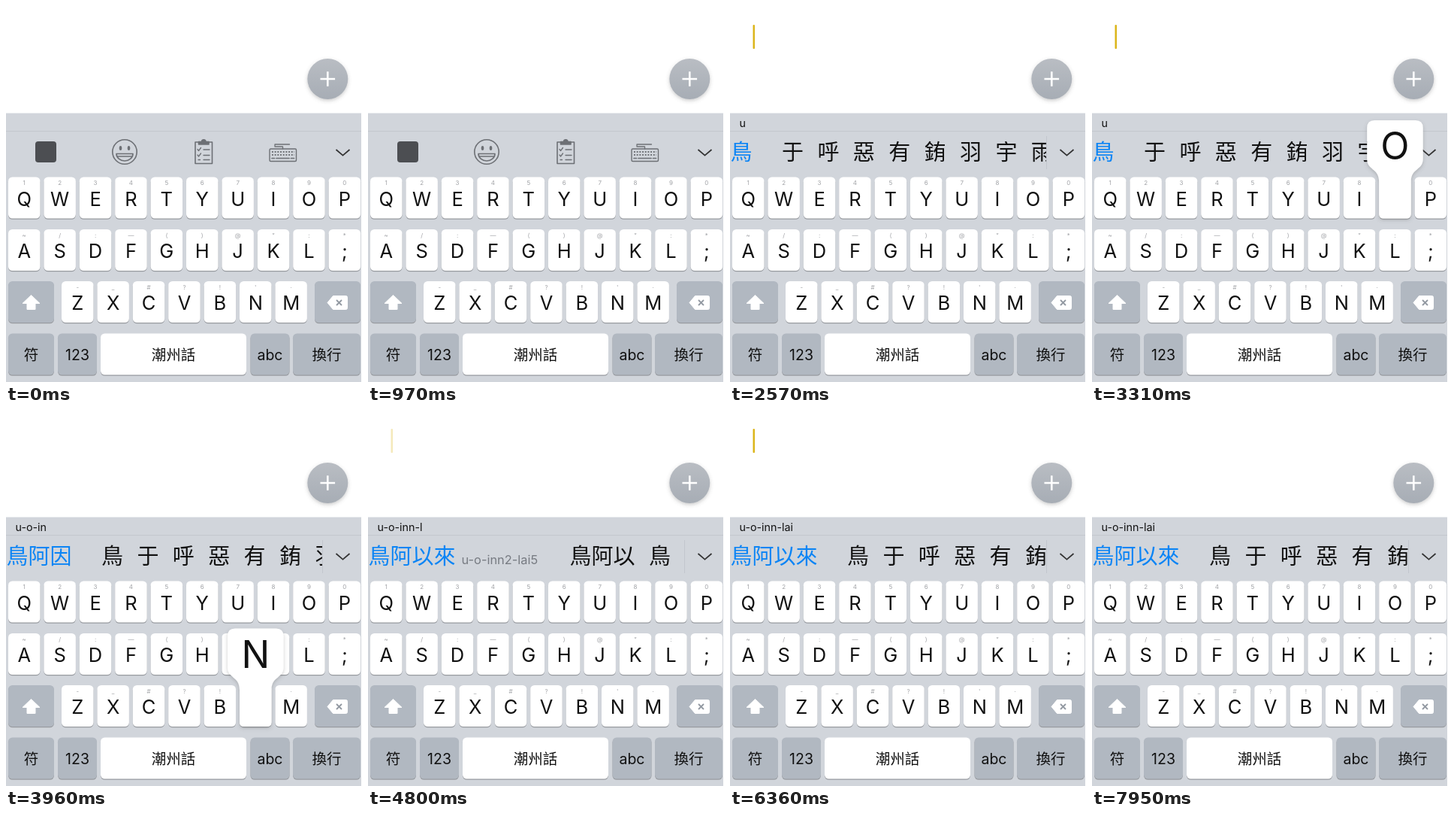
Write an HTML page that moves like this. It is 474 by 500 pixels and loops after 8 s.

```html
<!DOCTYPE html>
<html lang="zh-Hant">
<head>
<meta charset="utf-8">
<title>Keyboard typing</title>
<style>
html, body { margin: 0; width: 100%; height: 100%; overflow: hidden; background: #fff; }
svg { display: block; width: 474px; height: 500px; }
text { font-family: Inter, "Noto Sans CJK TC", "Noto Sans CJK", sans-serif; fill: #111; }
.mid { text-anchor: middle; }
.hint { font-size: 8px; fill: #a0a2a6; text-anchor: middle; }
.line { fill: none; stroke: #6d7075; stroke-width: 1.6; stroke-linecap: round; stroke-linejoin: round; }
</style>
</head>
<body>
<svg id="stage" viewBox="0 0 474 500">
  <defs>
    <linearGradient id="knob" x1="0" y1="0" x2="0" y2="1">
      <stop offset="0" stop-color="#b9bdc3"/><stop offset="1" stop-color="#a7adb5"/>
    </linearGradient>
    <filter id="soft" x="-30%" y="-30%" width="160%" height="160%">
      <feDropShadow dx="0" dy="2" stdDeviation="2.5" flood-color="#555" flood-opacity=".3"/>
    </filter>
    <clipPath id="bar"><rect y="168" width="421" height="54"/></clipPath>
  </defs>
  <rect width="474" height="500" fill="#fff"/>
  <rect id="caret" x="30.5" y="25" width="2.5" height="32" rx="1" fill="#dcb51a"/>
  <circle cx="428.3" cy="97" r="27" fill="url(#knob)" filter="url(#soft)"/>
  <path d="M418.5 97h19.6M428.3 87.2v19.6" stroke="#fff" stroke-width="2.6"/>

  <rect y="142.5" width="473" height="357.5" fill="#d1d5db"/>
  <path d="M0 166.5H473" stroke="#c3c7cd"/>
  <path id="split" d="M421.5 173V217" stroke="#c2c6cd"/>

  <g id="tools">
    <rect x="39" y="180" width="28" height="28" rx="4" fill="#4c4e52"/>
    <g class="line">
      <circle cx="158" cy="194" r="16.2"/>
      <path d="M147 196.500H169A11 9.500 0 0 1 147 196.500Z" fill="#d1d5db"/>
      <path d="M148.500 200H167.500"/>
      <path d="M256 181H252V209.500H274.500V181H270.500"/>
      <path d="M256.500 184V180.500H260.500A2.700 2.700 0 0 1 266 180.500H270V184Z" fill="#6d7075"/>
      <path d="M255 190.500l1.500 2 3-4M263 191h8M255 198l1.500 2 3-4M263 198.500h8M256 204.500h2.500M263 204.500h8" stroke-width="1.3"/>
      <rect x="351" y="190" width="35.500" height="16.500" rx="1.500" stroke-width="1.4"/>
      <path d="M368.500 190V187H358V184H377.500" stroke-width="1.3"/>
      <path d="M354 194H384M354 198H384" stroke-dasharray="1.8 1.900" stroke-width="2" stroke-linecap="butt"/>
      <path d="M354 202.500h3.500M360 202.500h17M379.500 202.500h4" stroke-width="1.700"/>
    </g>
    <ellipse cx="152.500" cy="189" rx="1.800" ry="3" fill="#6d7075"/>
    <ellipse cx="163.500" cy="189" rx="1.800" ry="3" fill="#6d7075"/>
  </g>
  <text id="typed" x="12.500" y="160.500" font-size="14.300"></text>
  <g id="picks" clip-path="url(#bar)"></g>
  <path d="M439.500 191L448.500 198.700L457.500 191" fill="none" stroke="#333" stroke-width="1.700"/>
  <g id="keys"></g>
  <g id="popup"><path fill="#fff" filter="url(#soft)"/><text class="mid" font-size="50"></text></g>
</svg>
<script>
const LOOP = 8000;
const $ = id => document.getElementById(id);

function add(parent, tag, attrs, text) {
  const el = document.createElementNS("http://www.w3.org/2000/svg", tag);
  for (const k in attrs) el.setAttribute(k, attrs[k]);
  if (text) el.textContent = text;
  parent.append(el);
  return el;
}

// Keyboard
const KEY_W = 42.5, KEY_H = 55, PITCH = 47.4;
const rows = [
  { x: 3, y: 227.5, keys: "QWERTYUIOP", hints: "1234567890" },
  { x: 3, y: 297, keys: "ASDFGHJKL;", hints: "~/:—()@”:*" },
  { x: 74, y: 366, keys: "ZXCVBNM", hints: "-_#?!'·" }
];
const spots = {};

function keycap(x, y, w, fill) {
  add($("keys"), "rect", { x, y: y + 1.3, width: w, height: KEY_H, rx: 5.5, fill: "#989ba0" });
  add($("keys"), "rect", { x, y, width: w, height: KEY_H, rx: 5.5, fill });
}

for (const { x: x0, y, keys, hints } of rows) {
  [...keys].forEach((ch, i) => {
    const x = x0 + i * PITCH, cx = x + KEY_W / 2;
    spots[ch] = { x, y };
    keycap(x, y, KEY_W, "#fff");
    add($("keys"), "text", { x: cx, y: y + 10.5, class: "hint" }, hints[i]);
    add($("keys"), "text", { x: cx, y: y + 38.3, class: "mid", "font-size": 25.5 }, ch);
  });
}

const GREY = "#b1b8c1";
keycap(3, 366, 61, GREY);
keycap(411, 366, 61, GREY);
add($("keys"), "path", { d: "M33.5 384.500L45 395.500H39V403.500H28V395.500H22Z", fill: "#fff", stroke: "#fff", "stroke-linejoin": "round" });
add($("keys"), "path", { d: "M435.500 385.500H452.500Q454.500 385.500 454.500 387.500V401.500Q454.500 403.500 452.500 403.500H435.500L428 394.500Z", fill: "#fff", stroke: "#fff", "stroke-linejoin": "round" });
add($("keys"), "path", { d: "M440 391l7 7M447 391l-7 7", stroke: "#9299a2", "stroke-width": 1.8 });

[[3, 61, "符"], [69, 52, "123"], [126, 194, "潮州話"], [325.5, 52, "abc"], [382, 90, "換行"]]
  .forEach(([x, w, label], i) => {
    keycap(x, 435.5, w, i === 2 ? "#fff" : GREY);
    add($("keys"), "text", { x: x + w / 2, y: 470.5, class: "mid", "font-size": 19.5 }, label);
  });

// Key presses: [letter, down, up]
const presses = [
  ["U", 1880, 2090], ["O", 3230, 3400], ["I", 3480, 3600], ["N", 3680, 3800],
  ["N", 3910, 4060], ["L", 4350, 4500], ["A", 4880, 5040], ["I", 5170, 5330]
];

// Composition steps: [time, typed, first pick, other picks, reading]
const more = "鳥 于 呼 惡 有 銪 羽 宇";
const steps = [
  [0, "", "", ""],
  [2090, "u", "鳥", "于 呼 惡 有 銪 羽 宇 雨"],
  [3400, "u-o", "鳥阿", more],
  [3600, "u-o-i", "鳥阿以", more],
  [3800, "u-o-in", "鳥阿因", more],
  [4060, "u-o-inn", "鳥阿以", more],
  [4500, "u-o-inn-l", "鳥阿以來", "鳥阿以 鳥", "u-o-inn2-lai5"],
  [5040, "u-o-inn-la", "鳥阿以來", "鳥阿以 鳥", "u-o-inn2-lai5"],
  [5330, "u-o-inn-lai", "鳥阿以來", more]
];

const HAN = 29, BASE = 204.5;
let shown = null;

function showStep(step) {
  if (step === shown) return;
  shown = step;
  const [, typed, first, others, reading] = step;
  $("typed").textContent = typed;
  $("tools").style.display = typed ? "none" : "";
  $("picks").replaceChildren();
  if (!first) return;
  const pick = (x, text, fill) => add($("picks"), "text", { x, y: BASE, "font-size": HAN, style: "fill:" + fill }, text);
  pick(0.5, first, "#0a84f5");
  let x = 0.5 + first.length * HAN + 39.5;
  if (reading) {
    add($("picks"), "text", { x: 124.5, y: 204.5, "font-size": 16.4, style: "fill:#777b82" }, reading);
    x = 268.5;
  }
  for (const word of others.split(" ")) {
    pick(x, word, "#111");
    x += word.length * HAN + 18.4;
  }
}

const [bubble, glyph] = $("popup").children;
let held = null;

function showPress(press) {
  if (press === held) return;
  held = press;
  $("popup").style.display = press ? "" : "none";
  if (!press) return;
  const { x, y } = spots[press[0]];
  const l = x - 16, r = x + KEY_W + 16, e = x + KEY_W, top = y - 75.5, b = y + KEY_H;
  bubble.setAttribute("d",
    `M${l} ${top + 10}Q${l} ${top} ${l + 10} ${top}H${r - 10}Q${r} ${top} ${r} ${top + 10}V${y - 24}` +
    `C${r} ${y - 9} ${e} ${y - 12} ${e} ${y + 6}V${b - 6}Q${e} ${b} ${e - 6} ${b}H${x + 6}` +
    `Q${x} ${b} ${x} ${b - 6}V${y + 6}C${x} ${y - 12} ${l} ${y - 9} ${l} ${y - 24}Z`);
  glyph.setAttribute("x", x + KEY_W / 2);
  glyph.setAttribute("y", y - 23.5);
  glyph.textContent = press[0];
}

// Caret fades in and out once a second
function caretAlpha(t) {
  const p = t % 1000;
  const clamp = v => Math.max(0, Math.min(1, v));
  return p < 500 ? clamp((p - 50) / 250) : clamp((900 - p) / 330);
}

function draw(t) {
  showStep(steps.filter(s => s[0] <= t).pop());
  showPress(presses.find(p => t >= p[1] && t < p[2]));
  $("caret").setAttribute("opacity", caretAlpha(t).toFixed(3));
  $("split").style.display = t < 1880 ? "none" : "";
}

$("popup").style.display = "none";
const start = performance.now();
function tick() {
  draw((performance.now() - start) % LOOP);
  requestAnimationFrame(tick);
}
draw(0);
requestAnimationFrame(tick);
</script>
</body>
</html>
```
